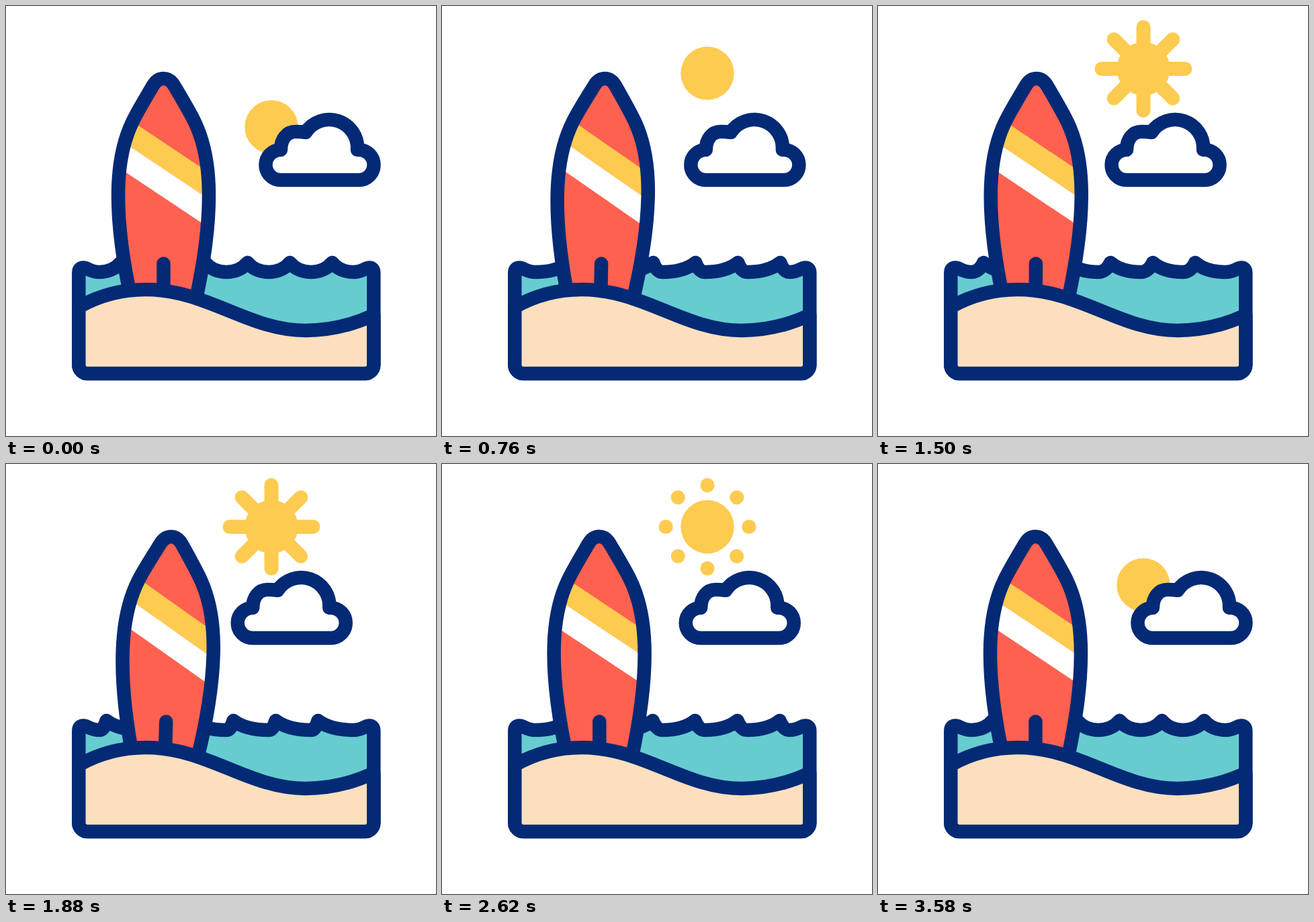
Animation, 640 px wide and 640 px high, one loop 3600 ms. Source, as an HTML page:

```html
<!DOCTYPE html>
<html>
<head>
<meta charset="utf-8">
<style>
  html, body { margin: 0; width: 100%; height: 100%; overflow: hidden; background: #fff; }
  svg { display: block; width: 100%; height: 100%; }
  .line { stroke: #042a75; stroke-width: 20.5; stroke-linejoin: round; stroke-linecap: round; }
</style>
</head>
<body>
<svg viewBox="0 0 640 640">
  <defs>
    <path id="outline" d="M187 440C176 390 167 330 167 282C167 236 175 200 188 173C195 158 209 135 219 118Q225 108 234.5 108Q244 108 250 118C260 135 274 158 281 173C294 200 302 236 302 282C302 330 293 390 282 440"/>
    <clipPath id="boardClip"><use href="#outline"/></clipPath>
  </defs>
  <g id="sun" fill="#fdcb50" stroke="#fdcb50" stroke-linecap="round">
    <circle r="39.7" stroke="none"/>
    <path id="rays" stroke-width="21"/>
  </g>
  <path id="cloud" class="line" fill="#fff" d="M409 259a22.5 22.5 0 0 1 0-45C409 198 418 187 431 187Q439 187 446 188A42 42 0 0 1 523 214h2a22.5 22.5 0 0 1 0 45Z"/>
  <path id="water" class="line" fill="#67ccd0"/>
  <g id="board">
    <use href="#outline" fill="#ff6150"/>
    <g clip-path="url(#boardClip)">
      <path fill="#fdcb50" d="M154.500 149.800l160 106.400v39.500l-160-106.400z"/>
      <path fill="#fff" d="M154.500 189.300l160 106.400v42.500l-160-106.400z"/>
    </g>
    <use href="#outline" class="line" fill="none"/>
    <path class="line" d="M234.500 383.500V440"/>
  </g>
  <path class="line" fill="#fcdfbe" d="M108.300 448C140 430 174 422 208 422C300 422 360 483 446 483C480 483 515 475 547.300 460V534a13 13 0 0 1-13 13H121.300a13 13 0 0 1-13-13Z"/>
</svg>
<script>
const LOOP = 3600;
const el = id => document.getElementById(id);

// Eased value at time t through [time, value] keys.
function track(t, keys) {
  if (t <= keys[0][0]) return keys[0][1];
  for (let i = 1; i < keys.length; i++) {
    const [t0, a] = keys[i - 1], [t1, b] = keys[i];
    if (t < t1) {
      const u = (t - t0) / (t1 - t0);
      return a + (b - a) * u * u * (3 - 2 * u);
    }
  }
  return keys[keys.length - 1][1];
}

const SUN_Y = [[180, 180], [880, 93.5], [2840, 93.5], [3540, 180]];
const RAY_END = [[900, 0], [1120, 62]];
const RAY_START = [[2410, 0], [2630, 62]];
const CLOUD_X = [[0, 0], [1800, -42], [3600, 0]];
const CREST_X = [[0, 0], [800, 18], [1800, -22], [2700, 18], [3600, 0]];
const TILT = [[0, 0], [580, 2], [1190, -2], [1775, 2], [2340, -2], [2920, 2], [3400, 0]];

// Troughs stay put while the crests between them lean sideways.
function waterPath(lean) {
  const top = 382, low = 396, step = 63;
  let d = `M108.300 534V397Q108.300 389.500 115.500 389.500C121 389.500 126 ${low} 139 ${low}`;
  for (let x = 139; x < 517; x += step) {
    const crest = x + step / 2 + lean, next = x + step;
    const rise = crest - x, fall = next - crest;
    d += `C${x + rise * .4} ${low} ${crest - rise * .23} ${top + 9} ${crest} ${top}` +
         `C${crest + fall * .23} ${top + 9} ${next - fall * .4} ${low} ${next} ${low}`;
  }
  return d + `C530 ${low} 535 389.500 540.500 389.500Q547.300 389.500 547.300 397V534a13 13 0 0 1-13 13H121.300a13 13 0 0 1-13-13Z`;
}

function rayPath(start, end) {
  if (start >= end) return '';
  let d = '';
  for (let i = 0; i < 8; i++) {
    const c = Math.cos(i * Math.PI / 4), s = Math.sin(i * Math.PI / 4);
    d += `M${c * start} ${s * start}L${c * end} ${s * end}`;
  }
  return d;
}

function draw(now) {
  const t = now % LOOP;
  el('sun').setAttribute('transform', `translate(395 ${track(t, SUN_Y)})`);
  el('rays').setAttribute('d', rayPath(track(t, RAY_START), track(t, RAY_END)));
  el('cloud').setAttribute('transform', `translate(${track(t, CLOUD_X)} 0)`);
  el('water').setAttribute('d', waterPath(track(t, CREST_X)));
  el('board').setAttribute('transform', `rotate(${track(t, TILT)} 234.5 515)`);
  requestAnimationFrame(draw);
}
draw(performance.now());
</script>
</body>
</html>
```
